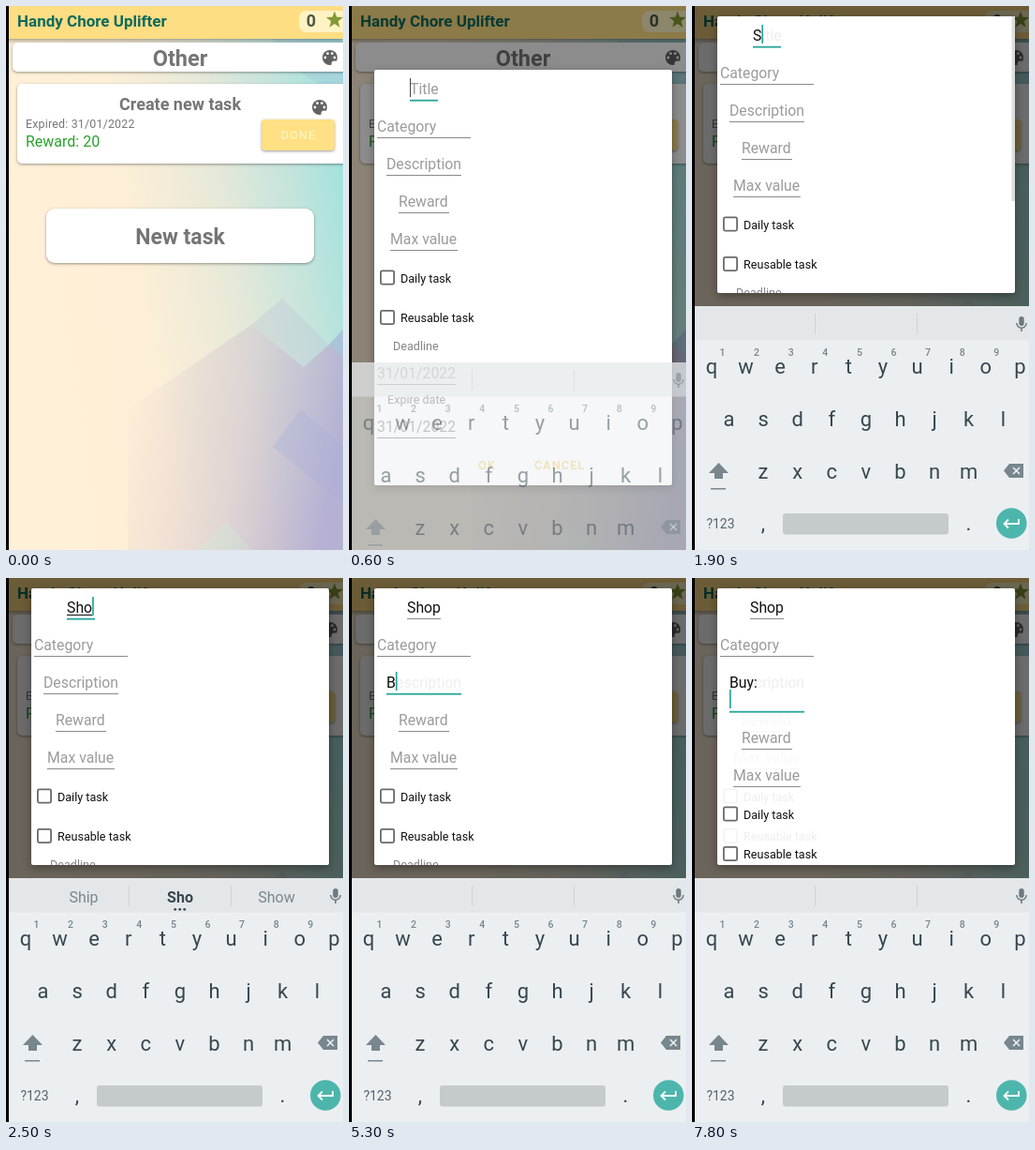
Write an HTML page with a canvas that moves like this. It is 360 px wide and 580 px high and loops after 8 s.

```html
<!DOCTYPE html>
<html lang="en">
<head>
<meta charset="utf-8">
<title>Task list</title>
<style>
  html, body { margin: 0; width: 100%; height: 100%; overflow: hidden; background: #000; }
  canvas { display: block; width: 360px; height: 580px; }
</style>
</head>
<body>
<canvas id="stage"></canvas>
<script>
const W = 360, H = 580, LOOP = 8000;
const TEAL = '#26a69a', HINT = '#9b9b9b', INK = '#111', GREY = '#757575', KEY = '#37474f';
const FIELD = 15.8, SMALL = 12.6;
const canvas = document.getElementById('stage');
const dpr = window.devicePixelRatio || 1;
canvas.width = W * dpr;
canvas.height = H * dpr;
const c = canvas.getContext('2d');

// Opening steps: time, dialog top and bottom, opacity, dim, keyboard offset and opacity
const OPENING = [
  [0, 68, 511, 0, 0, 260, 0],
  [500, 68, 511, .84, .14, 260, 0],
  [600, 68, 511, 1, .45, 60, .5],
  [700, 24, 362, 1, .58, 2, .94],
  [800, 13, 308, 1, .58, 0, 1],
  [900, 11, 306, 1, .58, 0, 1]
];
const TITLE = [[0, ''], [1900, 'S'], [2300, 'Sh'], [2500, 'Sho'], [3000, 'Shop']];
const NOTE = [[0, ''], [5300, 'B'], [5600, 'Bu'], [5800, 'Buy'], [6400, 'Buy:']];
const FOCUS = [[0, 'title'], [3800, 'category'], [4100, 'note']];
const CURSOR = [[0, 1], [1400, 0], [1900, 1], [3600, 0], [3800, 1], [4500, 0],
  [5000, 1], [6300, 0], [6400, 1], [6900, 0], [7300, 1]];
const WORDS = [[0, ''], [2000, 'So S She'], [2400, 'She Sh Show'], [2500, 'Ship Sho Show'],
  [3100, 'Ship Shop Shops'], [3800, ''], [5500, 'But B Be'], [5700, 'But Bu Bus'],
  [5900, 'But Buy By'], [6600, '']];

const at = (list, t) => list.filter(e => e[0] <= t).pop();
const value = (list, t) => at(list, t)[1];

function text(s, x, y, size, color, { weight = 400, align = 'left', gap = 0 } = {}) {
  c.font = `${weight} ${size}px Roboto, Arial, sans-serif`;
  c.textAlign = align;
  c.letterSpacing = gap + 'px';
  c.fillStyle = color;
  c.fillText(s, x, y);
}
function rect(x, y, w, h, color) {
  c.fillStyle = color;
  c.fillRect(x, y, w, h);
}
function round(x, y, w, h, r, color) {
  c.beginPath();
  c.roundRect(x, y, w, h, r);
  c.fillStyle = color;
  c.fill();
}
function disc(x, y, r, color) {
  c.beginPath();
  c.arc(x, y, r, 0, 7);
  c.fillStyle = color;
  c.fill();
}
function poly(points, color) {
  c.beginPath();
  points.forEach(([x, y]) => c.lineTo(x, y));
  c.closePath();
  c.fillStyle = color;
  c.fill();
}
function line(points, color, width) {
  c.beginPath();
  points.forEach(([x, y]) => c.lineTo(x, y));
  c.strokeStyle = color;
  c.lineWidth = width;
  c.stroke();
}
function shadowed(blur, dy, color, draw) {
  c.save();
  c.shadowColor = color;
  c.shadowBlur = blur * dpr;
  c.shadowOffsetY = dy * dpr;
  draw();
  c.restore();
}
const card = (x, y, w, h, r, color = '#fff') =>
  shadowed(3, 1, 'rgba(0,0,0,.4)', () => round(x, y, w, h, r, color));

function backdrop() {
  const across = c.createLinearGradient(0, 250, W, 190);
  [[0, '#fff0d7'], [.36, '#fdefd7'], [.62, '#e9e9d9'], [.85, '#c4e4dc'], [1, '#a5e2de']]
    .forEach(([p, color]) => across.addColorStop(p, color));
  rect(0, 0, W, H, across);
  const low = c.createLinearGradient(130, 400, W, 450);
  low.addColorStop(0, 'rgba(205,185,205,0)');
  low.addColorStop(.55, 'rgba(205,188,205,.45)');
  low.addColorStop(1, 'rgba(178,168,210,.85)');
  poly([[130, 430], [262, 340], [318, 385], [345, 361], [360, 373], [360, 580], [130, 580]], low);
  poly([[262, 340], [295, 312], [345, 361], [318, 385]], 'rgba(190,200,215,.4)');
  poly([[345, 361], [360, 345], [360, 373]], 'rgba(160,175,215,.6)');
  poly([[285, 470], [315, 430], [360, 470], [360, 530]], 'rgba(165,175,215,.35)');
  poly([[205, 580], [235, 550], [262, 580]], 'rgba(200,235,215,.35)');
  poly([[285, 35], [310, 68], [360, 100], [360, 35]], 'rgba(165,185,215,.3)');
}

function palette(x, y) {
  disc(x, y, 8, '#616161');
  disc(x + 5, y + 7, 3.4, '#fff');
  [[-5, 0], [-2.4, -4.3], [2.4, -4.3], [5, 0]].forEach(([dx, dy]) => disc(x + dx, y + dy, 1.4, '#fff'));
}

function star(x, y, r) {
  const points = Array.from({ length: 10 }, (_, i) => {
    const a = i * Math.PI / 5 - Math.PI / 2, d = i % 2 ? r * .42 : r;
    return [x + d * Math.cos(a), y + d * Math.sin(a)];
  });
  poly(points, '#839a35');
}

function page() {
  const bold = { weight: 700, align: 'center' };
  backdrop();
  shadowed(4, 2, 'rgba(0,0,0,.35)', () => rect(0, 0, W, 35, '#ffdd83'));
  text('Handy Chore Uplifter', 12, 22, 17, '#0b6a5d', { weight: 700 });
  round(313, 5, 60, 23, 8, '#fff3c4');
  text('0', 326, 22, 18, '#4c5945', bold);
  star(351, 15, 9.5);

  card(7, 39, 370, 31, 5);
  text('Other', 186, 64, 23.5, GREY, bold);
  palette(346, 55);

  card(12, 83, 365, 85, 5);
  text('Create new task', 186, 111, 18, GREY, bold);
  palette(335, 108);
  text('Expired: 31/01/2022', 21, 130, 12.4, '#777', { gap: .2 });
  text('Reward: 20', 21, 150, 16, '#29a32c');
  card(273, 121, 78, 33, 4, '#ffe084');
  text('DONE', 312.5, 142, 12.4, '#fff3bd', { weight: 500, align: 'center', gap: 1.2 });

  card(43, 216, 286, 58, 9);
  text('New task', 186, 254, 23, GREY, bold);
}

function field(hint, x, y, width, { typed = '', focus = false, drop = 0 } = {}) {
  text(typed || hint, x, y + 6, FIELD, typed ? INK : HINT);
  if (focus) rect(x, y + 11.8 + drop, width, 1.8, TEAL);
  else rect(x, y + 12, width, 1, '#8a8a8a');
}

function check(label, y) {
  c.strokeStyle = '#6a6a6a';
  c.lineWidth = 1.8;
  c.beginPath();
  c.roundRect(33.9, y - 7.1, 14.2, 14.2, 1.5);
  c.stroke();
  text(label, 55, y + 5, SMALL, INK);
}

function lowerFields(y) {
  field('Reward', 53, y + 140, 54);
  field('Max value', 44, y + 180, 72);
  check('Daily task', y + 221.5);
  check('Reusable task', y + 264);
  [['Deadline', 47, 295], ['Expire date', 41, 352]].forEach(([label, x, dy]) => {
    text(label, x, y + dy + 4, SMALL, '#858585');
    field('31/01/2022', 30, y + dy + 28, 84);
  });
}

function ghost(draw) {
  c.save();
  c.globalAlpha *= .07;
  draw();
  c.restore();
}

function dialog(t, top, bottom, alpha) {
  const title = value(TITLE, t), note = value(NOTE, t), focus = value(FOCUS, t);
  const drop = t >= 7800 ? 19 : 0;
  const composing = (x, y, w) => rect(x, y + 8, w, 1, INK);

  c.save();
  c.globalAlpha = alpha;
  shadowed(10, 3, 'rgba(0,0,0,.35)', () => round(27, top, 318, bottom - top, 2, '#fff'));
  c.beginPath();
  c.rect(27, top, 318, bottom - top);
  c.clip();

  c.font = `400 ${FIELD}px Roboto, Arial, sans-serif`;
  c.letterSpacing = '0px';
  const titleWidth = c.measureText(title).width, noteWidth = c.measureText(note).width;
  const width = Math.max(30, titleWidth), left = 80 - width / 2;

  field('Title', left, top + 20, width, { typed: title, focus: focus === 'title' });
  if (focus === 'title' && t >= 2000) composing(left, top + 20, titleWidth);
  field('Category', 30, top + 60, 100, { focus: focus === 'category' });
  field('Description', 40, top + 100, 80, { typed: note, focus: focus === 'note', drop });
  if (t >= 5500 && t < 6400) composing(40, top + 100, noteWidth);
  lowerFields(top + drop);

  if (t >= 1900 && t < 2000) ghost(() => text('Title', 65, top + 26, FIELD, INK));
  if (t >= 5300 && t < 5500) ghost(() => text('Description', 40, top + 106, FIELD, INK));
  if (drop) ghost(() => {
    text('Description', 40, top + 106, FIELD, INK);
    lowerFields(top);
  });

  if (value(CURSOR, t)) {
    const spots = {
      title: [left + titleWidth, 10],
      category: [30, 50],
      note: [drop ? 40 : 40 + noteWidth, 90 + drop]
    };
    const [x, y] = spots[focus];
    rect(x, top + y - 1, t < 900 ? 1 : 1.7, 20, t < 900 ? '#444' : TEAL);
  }
  if (t >= 800 && t < 2000) rect(341.5, top, 3.5, 197, '#dedede');
  text('OK', 138, top + 426, SMALL, '#f5d679', { weight: 500, gap: 1.1 });
  text('CANCEL', 198, top + 426, SMALL, '#f5d679', { weight: 500, gap: 1.1 });
  c.restore();
}

function mic(x, y) {
  round(x - 2.7, y - 8, 5.4, 10, 2.7, '#6d797f');
  c.beginPath();
  c.arc(x, y - 1, 5.2, 0, Math.PI);
  c.strokeStyle = '#6d797f';
  c.lineWidth = 1.5;
  c.stroke();
  rect(x - .8, y + 4, 1.6, 4, '#6d797f');
}

function keyboard(t, offset, alpha) {
  const mid = { align: 'center' }, step = 36.6;
  c.save();
  c.globalAlpha = alpha;
  c.translate(0, offset);
  rect(0, 320, W, 260, '#eceff1');
  rect(0, 320, W, 36.5, '#e4e7e9');
  [131, 240].forEach(x => rect(x, 328, 1, 22, '#cdd2d5'));
  mic(352, 339);

  const words = value(WORDS, t);
  if (words) {
    words.split(' ').forEach((word, i) => text(word, 83 + 103 * i, 345.5, 16,
      i === 1 ? KEY : '#7b878d', { align: 'center', weight: i === 1 ? 700 : 400 }));
    [-5, 0, 5].forEach(dx => disc(185.7 + dx, 353.3, 1.4, KEY));
  }

  [['qwertyuiop', 21, 391.5], ['asdfghjkl', 39.5, 447.5], ['zxcvbnm', 76, 503.5]].forEach(([row, x, y]) =>
    [...row].forEach((key, i) => text(key, x + i * step, y, 22, KEY, mid)));
  for (let i = 0; i < 9; i++) text(i + 1, 32.5 + i * step, 372.5, 10.5, '#78858b', { align: 'center', weight: 500 });

  poly([[28.5, 487], [39, 498], [33, 498], [33, 504], [24, 504], [24, 498], [18, 498]], '#78868d');
  rect(20, 514, 16, 1.5, '#78868d');
  poly([[333, 495.5], [339, 488], [354, 488], [354, 503], [339, 503]], '#78868d');
  line([[343, 492], [350, 499]], '#eceff1', 1.6);
  line([[350, 492], [343, 499]], '#eceff1', 1.6);

  text('?123', 30.5, 556.5, 14, '#55646b', mid);
  text(',', 76, 559, 22, KEY, mid);
  round(97, 541, 177, 22.5, 3, '#c5cacd');
  text('.', 295.5, 559, 22, KEY, mid);
  disc(341.3, 551.5, 16.3, '#4db6ac');
  line([[349, 547], [349, 552], [334, 552]], '#fff', 1.8);
  line([[338, 547.5], [333.5, 552], [338, 556.5]], '#fff', 1.8);
  c.restore();
}

function render(t) {
  const [, top, bottom, alpha, dim, offset, keys] = at(OPENING, t);
  c.setTransform(dpr, 0, 0, dpr, 0, 0);
  page();
  if (dim) rect(0, 0, W, H, `rgba(0,0,0,${dim})`);
  if (alpha) dialog(t, top, bottom, alpha);
  if (keys) keyboard(t, offset, keys);
  rect(0, 0, 3, H, '#000');
}

const start = performance.now();
function tick() {
  render((performance.now() - start) % LOOP);
  requestAnimationFrame(tick);
}
tick();
</script>
</body>
</html>
```
